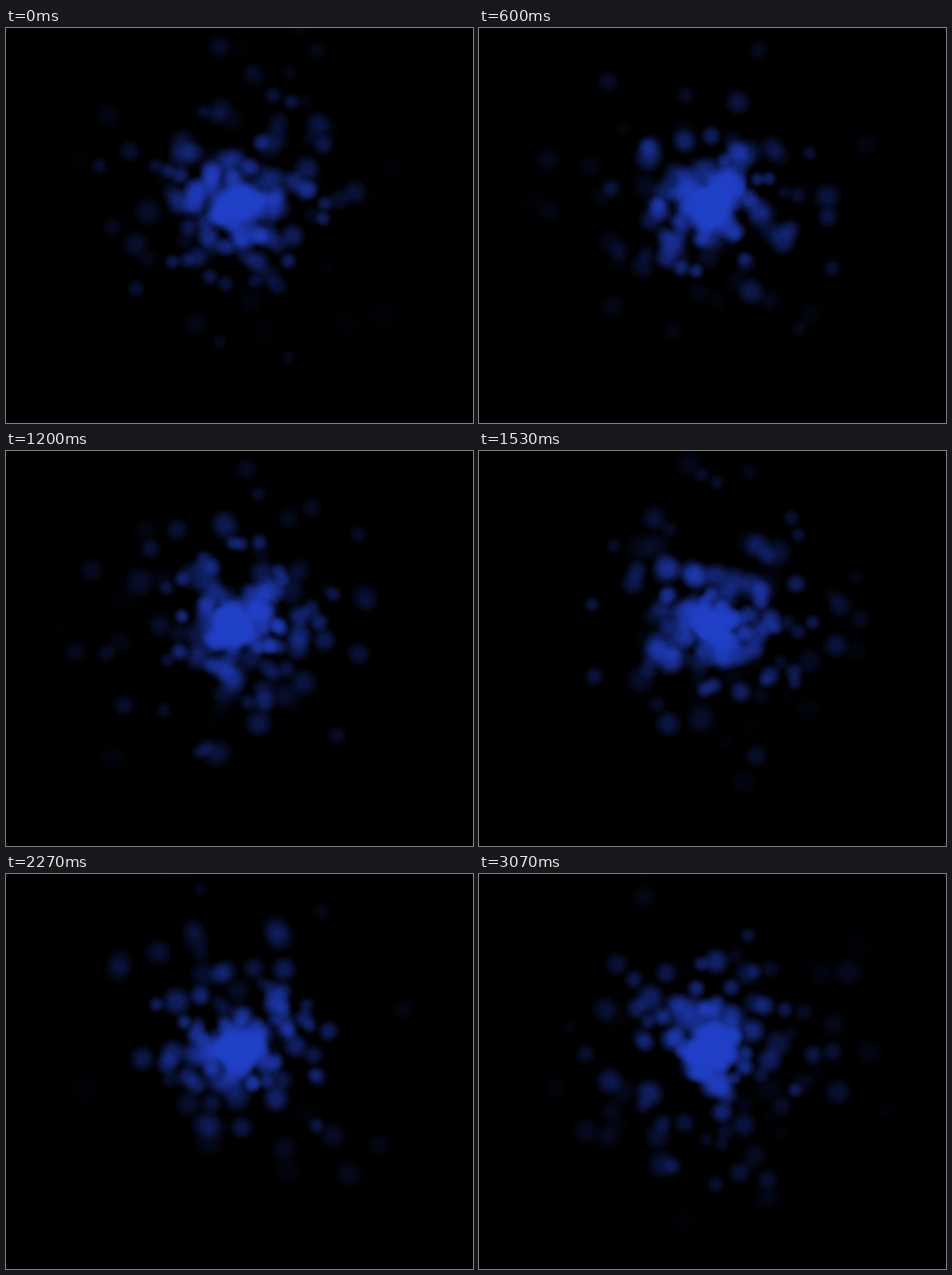
An HTML page with a canvas for the animation above (3.14 s loop, 549 by 464 pixels).

```html
<!DOCTYPE html>
<html lang="en">
<head>
<meta charset="utf-8">
<title>Blue particle burst</title>
<style>
  html, body { margin: 0; width: 100%; height: 100%; overflow: hidden; background: #000; }
  canvas { display: block; }
</style>
</head>
<body>
<canvas id="stage" width="549" height="464"></canvas>
<script>
const ctx = document.getElementById('stage').getContext('2d');
const W = 549, H = 464, CX = 273, CY = 206;
const LOOP = 3140, FPS = 15;
const MAX_LIFE = 1100, MAX_REACH = 240, EMITTED = 850;
const PEAK_ALPHA = 0.78, CORE = 0.3;

let seed = 20417;
function rand(min, max) {
  seed = (seed * 1664525 + 1013904223) % 4294967296;
  return min + (max - min) * seed / 4294967296;
}

// Emission starts one lifetime early, so the cloud is full at time 0.
// Slow particles stay near the centre and build up its solid core.
const particles = Array.from({ length: EMITTED }, (_, i) => ({
  birth: (LOOP + MAX_LIFE) * i / EMITTED - MAX_LIFE,
  life: rand(850, MAX_LIFE),
  angle: rand(0, Math.PI * 2),
  reach: rand(0, MAX_REACH),
  radius: rand(10, 20)
}));

const blue = alpha => `rgba(32,64,200,${alpha})`;

function drawParticle({ birth, life, angle, reach, radius }, time) {
  const age = (time - birth) / life;
  if (age < 0 || age >= 1) return;
  const x = CX + Math.cos(angle) * reach * age;
  const y = CY + Math.sin(angle) * reach * age;
  const alpha = PEAK_ALPHA * (1 - age);
  const glow = ctx.createRadialGradient(x, y, 0, x, y, radius);
  glow.addColorStop(0, blue(alpha));
  glow.addColorStop(CORE, blue(alpha));
  glow.addColorStop(1, blue(0));
  ctx.fillStyle = glow;
  ctx.fillRect(x - radius, y - radius, radius * 2, radius * 2);
}

// The picture steps at 15 per second, with step times rounded to 10 ms.
function stepTime(ms) {
  const step = Math.floor((Math.floor(ms / 10) + 0.5) * FPS / 100);
  return Math.round(step * 100 / FPS) * 10;
}

let shown = -1;
function draw() {
  const time = stepTime(performance.now() % LOOP);
  if (time !== shown) {
    shown = time;
    ctx.fillStyle = '#000';
    ctx.fillRect(0, 0, W, H);
    for (const p of particles) drawParticle(p, time);
  }
  requestAnimationFrame(draw);
}
draw();
</script>
</body>
</html>
```
